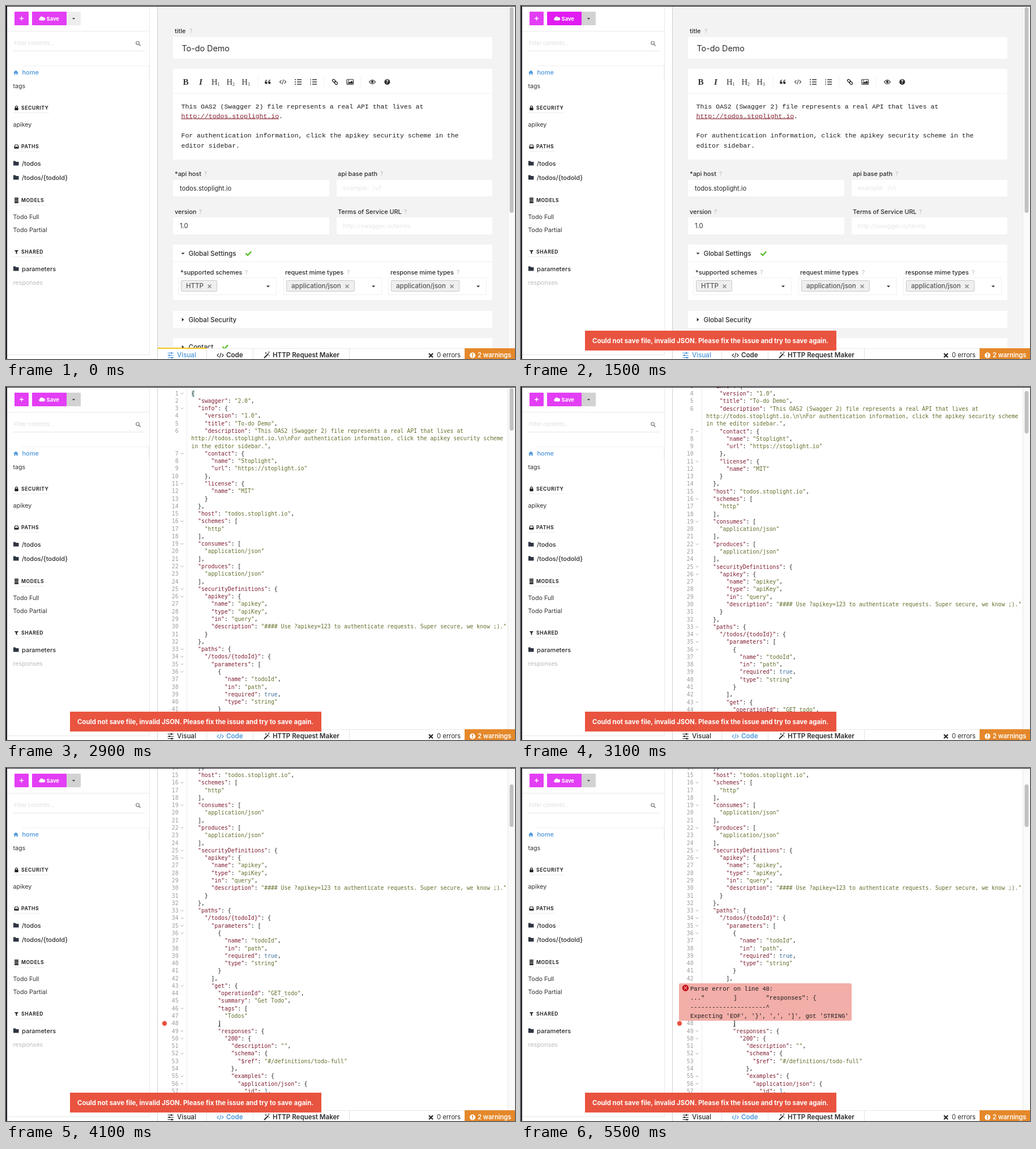
An HTML page that plays this animation: 899 by 623 pixels, repeating every 5.6 s.

```html
<!DOCTYPE html>
<html lang="en">
<head>
<meta charset="utf-8">
<title>API editor</title>
<style>
html, body { margin: 0; width: 100%; height: 100%; overflow: hidden; background: #fff; }
svg { display: block; width: 899px; height: 623px; }
text { font-family: Inter, sans-serif; white-space: pre; fill: #2b2b2f; }
.mono { font-family: "DejaVu Sans Mono", monospace; font-size: 9.74px; fill: #222; }
.courier { font-family: "Liberation Mono", monospace; fill: #1c1c1c; }
.serif { font-family: "Liberation Serif", serif; fill: #333; }
.key { fill: #7f1d30; }
.str { fill: #61712c; }
.atom { fill: #3d6f9e; }
.num { fill: #9c9c9c; text-anchor: end; }
.line { fill: none; stroke-linecap: round; stroke-linejoin: round; }

.anim { animation: 5.6s step-end -10ms infinite; }
#save { animation-name: save; }
#caret { animation-name: caret; }
#toast { animation-name: toast; }
#visual, .tabVisual { animation-name: leave; }
#code, .tabCode { animation-name: enter; }
#lines { animation-name: scroll; }
#thumb { animation-name: thumb; }
#beam { animation-name: beam; }
#popup { animation-name: popup; }

@keyframes save {
  0%, 51.79% { fill: #e33ef5; }
  16.07% { fill: #d70bf0; }
  25%, 50% { fill: #e11cf2; }
  100% { fill: #e33ef5; }
}
@keyframes caret { 0% { fill: #ededed; } 25%, 100% { fill: #d2d2d2; } }
@keyframes toast { 0% { visibility: hidden; } 25%, 100% { visibility: visible; } }
@keyframes leave { 0% { visibility: visible; } 35.71%, 100% { visibility: hidden; } }
@keyframes enter { 0% { visibility: hidden; } 35.71%, 100% { visibility: visible; } }
@keyframes scroll {
  0% { transform: none; }
  51.79% { transform: translateY(0); animation-timing-function: steps(2); }
  55.36% { transform: translateY(-39.3px); animation-timing-function: steps(7); }
  67.86%, 100% { transform: translateY(-211px); }
}
@keyframes thumb {
  0% { transform: none; }
  51.79% { transform: translateY(0); animation-timing-function: steps(2); }
  55.36% { transform: translateY(5px); animation-timing-function: steps(7); }
  67.86%, 100% { transform: translateY(27px); }
}
@keyframes beam { 0% { visibility: hidden; } 69.64%, 100% { visibility: visible; } }
@keyframes popup { 0% { visibility: hidden; } 78.57%, 100% { visibility: visible; } }
</style>
</head>
<body>
<svg id="stage" viewBox="0 0 899 623"></svg>
<script>
const esc = s => s.replace(/&/g, '&amp;').replace(/</g, '&lt;');
const text = (x, y, s, size, o = {}) =>
  `<text x="${x}" y="${y}" class="${o.cls || ''}" style="font-size:${size}px;font-weight:${o.w || 400};` +
  `${o.fill ? `fill:${o.fill};` : ''}${o.css || ''}">${esc(s)}</text>`;
const rect = (x, y, w, h, fill, extra = '') =>
  `<rect x="${x}" y="${y}" width="${w}" height="${h}" fill="${fill}" ${extra}/>`;
const fillPath = (d, fill = '#2b2b2f') => `<path d="${d}" fill="${fill}"/>`;
const line = (d, color = '#333', w = 1.2) =>
  `<path class="line" d="${d}" stroke="${color}" stroke-width="${w}"/>`;
const dot = (x, y, r, fill) => `<circle cx="${x}" cy="${y}" r="${r}" fill="${fill}"/>`;
const group = (attrs, ...parts) => `<g ${attrs}>${parts.join('')}</g>`;

const caretDown = (x, y, s = 3) => fillPath(`M${x - s} ${y - s / 2}h${2 * s}l${-s} ${s}z`);
const caretRight = (x, y) => fillPath(`M${x - 1.8} ${y - 3.2}v6.4l3.6 -3.2z`);
const cross = (x, y, s, color, w) =>
  line(`M${x - s} ${y - s}l${2 * s} ${2 * s}m0 ${-2 * s}l${-2 * s} ${2 * s}`, color, w);
const check = (x, y) => line(`M${x - 4} ${y}l3 3l5.5 -6`, '#4fbd1a', 2.2);
const folder = y => fillPath(`M13 ${y - 4}h3.5l1.2 1.4h4.8v6.6h-9.5z`, '#2f3542');
const angle = (x, y, color) =>
  line(`M${x - 3} ${y - 2.5}l-2.5 2.5l2.5 2.5M${x + 3} ${y - 2.5}l2.5 2.5l-2.5 2.5M${x + 1} ${y - 4}l-2 8`, color, 1.1);

function sidebar() {
  const heading = (y, s, width) =>
    text(27, y + 3.2, s, 8.6, { w: 700, css: 'letter-spacing:.6px' }) + rect(13, y + 8, width, 1, '#ececec');
  const item = (y, s, fill = '#333') => text(12.5, y + 4, s, 10.7, { fill });
  const folderItem = (y, s) => folder(y) + text(28, y + 4, s, 11, { w: 500 });
  return [
    rect(15, 10, 25, 24, '#e33ef5', 'rx="1"'),
    line('M24.5 22h6m-3 -3v6', '#fff', 1.4),
    rect(46, 10, 61, 24, '#e33ef5', 'rx="1" id="save" class="anim"'),
    rect(107, 10, 25, 24, '#ededed', 'rx="1" id="caret" class="anim"'),
    fillPath('M60 25.5a2.4 2.4 0 0 1 -.3 -4.6a3.2 3.2 0 0 1 5.8 -1a2.3 2.3 0 0 1 1.5 5.6z', '#fff'),
    text(71.5, 25.6, 'Save', 9.4, { w: 700, fill: '#fff' }),
    caretDown(119.5, 22.5, 2.6),
    rect(2, 44, 252, 1, '#ebebeb'),
    text(14, 69, 'Filter contents...', 9.4, { fill: '#dedede' }),
    rect(12, 79, 233, 1, '#e6e6e6'),
    '<circle cx="232.5" cy="65.3" r="2.8" fill="none" stroke="#777" stroke-width="1.2"/>',
    line('M234.8 67.6l2.3 2.3', '#777', 1.4),
    rect(28, 105, 225, 1, '#f0f0f0'), rect(252, 106, 1, 22, '#f0f0f0'),
    fillPath('M13.2 117.6l4.3 -4l4.3 4h-1.2v3.6h-2.2v-2.6h-1.8v2.6h-2.2v-3.6z', '#4a94db'),
    text(28.5, 121.3, 'home', 11, { w: 500, fill: '#4a94db' }),
    item(140.5, 'tags'),
    line('M16.6 179.5v-1.2a1.9 1.9 0 0 1 3.8 0v1.2', '#222', 1.2),
    rect(15.3, 179.2, 6.4, 4.8, '#222', 'rx=".7"'),
    heading(180, 'SECURITY', 63), item(209, 'apikey'),
    line('M15 248.5l1.2 -3.5h4.6l1.2 3.5v2.5h-7z', '#222', 1.2),
    rect(15, 248.5, 7, 2.8, '#222'),
    heading(248, 'PATHS', 47), folderItem(277.5, '/todos'), folderItem(302.5, '/todos/{todoId}'),
    [339.2, 341.8, 344.4, 347].map(y => rect(14.8, y - 1, 7.4, 2, '#222', 'rx="1"')).join(''),
    heading(343, 'MODELS', 55), item(371.5, 'Todo Full'), item(394.5, 'Todo Partial'),
    fillPath('M14.8 431h7.4l-2.7 3v4l-2 -1.3v-2.7z'),
    heading(434, 'SHARED', 54), folderItem(463.5, 'parameters'), item(487.5, 'responses', '#bbb'),
    rect(2, 615, 252, 1, '#e8e8e8'), rect(253, 1, 1, 615, '#e8e8e8'),
  ].join('');
}

function toolbar() {
  const serif = (x, s, size, css = '', w = 400) => text(x, 139, s, size, { cls: 'serif', css, w });
  const bars = (x, bullet) => [130, 134, 138].map(y => rect(x + 4, y - .7, 8, 1.5, '#333') + bullet(x, y)).join('');
  const quote = x => dot(x, 135.5, 2.2, '#333') + line(`M${x - 1.6} 135.5q0 -4 2.8 -4.8`, '#333', 1.3);
  return [
    serif(312.5, 'B', 15, '', 700), serif(341, 'I', 15, 'font-style:italic', 700),
    [1, 2, 3].map((n, i) => serif(363 + i * 26.6, 'H', 14.5) +
      text(373.5 + i * 26.6, 141, `${n}`, 8, { cls: 'serif' })).join(''),
    [445, 561, 626].map(x => rect(x, 124, 1, 20, '#f1f1f1')).join(''),
    quote(459.5), quote(465.3), angle(489, 134, '#444'),
    bars(510, (x, y) => dot(x + 1, y, 1.1, '#333')),
    bars(537, (x, y) => rect(x + .5, y - 1.3, 1, 2.6, '#333')),
    group('transform="rotate(45 581 134)" fill="none" stroke="#333" stroke-width="1.4"',
      '<rect x="575.5" y="132" width="6" height="4" rx="2"/><rect x="580.5" y="132" width="6" height="4" rx="2"/>'),
    rect(602, 129.5, 11.5, 9, 'none', 'rx="1" stroke="#333" stroke-width="1.2"'),
    fillPath('M603.5 137.3v-1.5l2.5 -2.5l1.5 1.5l3 -3l2 2v3.5z', '#333'), dot(605.2, 132, 1, '#333'),
    line('M641.5 134q5.5 -7 11 0q-5.5 7 -11 0z', '#333', 1.2), dot(647, 133.7, 2.2, '#333'),
    dot(673.3, 134, 5, '#2b2b2f'), text(670.7, 137.4, '?', 8.5, { w: 700, fill: '#fff' }),
  ].join('');
}

function visual() {
  const card = (x, y, w, h) => rect(x, y, w, h, '#fff');
  const label = (x, y, s, hintX) =>
    text(x, y + 4, s, 10.9, { w: 500 }) + text(hintX, y + 4, '?', 10, { fill: '#b9b9b9' });
  const body = (y, s, o) => text(309.5, y, s, 11.5, { cls: 'courier', ...o });
  const select = (x, s, w) => [
    rect(x + .5, 479.5, 173, 30, '#fff', 'stroke="#f0f0f0"'),
    rect(x + 5.5, 484.5, w, 19, '#efefef', 'stroke="#c9c9c9" rx="1"'),
    text(x + 14, 498, s, 11.5, { w: 500, fill: '#555' }),
    cross(x + w - 7.5, 494.7, 2.5, '#888', 1.6), caretDown(x + 159, 495),
  ].join('');
  return [
    rect(268, 1, 618, 603, '#f3f3f3'),
    label(298, 44, 'title', 324), card(295, 55, 564, 38), text(310.5, 79.7, 'To-do Demo', 14.3),
    card(295, 111, 564, 160), rect(295, 154, 564, 1, '#f1f1f1'), toolbar(),
    body(180.5, 'This OAS2 (Swagger 2) file represents a real API that lives at'),
    body(197.5, 'http://todos.stoplight.io', { fill: '#84212f', css: 'text-decoration:underline' }),
    body(197.5, ' '.repeat(25) + '.'),
    body(232, 'For authentication information, click the apikey security scheme in the'),
    body(249.5, 'editor sidebar.'),
    label(298, 296, '*api host', 350), label(586, 296, 'api base path', 661),
    card(295, 307, 276, 29), card(584, 307, 275, 29),
    text(307, 325.5, 'todos.stoplight.io', 11.2), text(595, 325.3, 'example: `/v1`', 10.8, { fill: '#e6e6e6' }),
    label(298, 362.5, 'version', 341), label(586, 362.5, 'Terms of Service URL', 703),
    card(295, 373, 276, 30), card(584, 373, 275, 30),
    text(307, 392, '1.0', 11.2), text(595, 392, 'http://swagger.io/terms', 10.8, { fill: '#e6e6e6' }),
    card(295, 421, 564, 98), rect(295, 451, 564, 1, '#f1f1f1'),
    caretDown(312.5, 437), text(322.5, 440.8, 'Global Settings', 11.6, { w: 500 }), check(428, 437),
    label(308, 469.5, '*supported schemes', 422), label(493, 469.5, 'request mime types', 602),
    label(679, 469.5, 'response mime types', 796),
    select(304, 'HTTP', 63), select(490, 'application/json', 120), select(675, 'application/json', 120),
    card(295, 538, 564, 30), caretRight(312.5, 553.5), text(322.5, 557.5, 'Global Security', 11.6, { w: 500 }),
    card(295, 586, 564, 30), caretRight(312.5, 602), text(322.5, 606, 'Contact', 11.6, { w: 500 }), check(387, 602),
    rect(889.5, 2, 7, 363, '#c1c1c1', 'rx="3.5"'),
  ].join('');
}

// Rows starting with ~ continue the wrapped string above them.
const source = String.raw`{
  "swagger": "2.0",
  "info": {
    "version": "1.0",
    "title": "To-do Demo",
    "description": "This OAS2 (Swagger 2) file represents a real API that lives at
~http://todos.stoplight.io.\n\nFor authentication information, click the apikey security scheme
~in the editor sidebar.",
    "contact": {
      "name": "Stoplight",
      "url": "https://stoplight.io"
    },
    "license": {
      "name": "MIT"
    }
  },
  "host": "todos.stoplight.io",
  "schemes": [
    "http"
  ],
  "consumes": [
    "application/json"
  ],
  "produces": [
    "application/json"
  ],
  "securityDefinitions": {
    "apikey": {
      "name": "apikey",
      "type": "apiKey",
      "in": "query",
      "description": "#### Use ?apikey=123 to authenticate requests. Super secure, we know ;)."
    }
  },
  "paths": {
    "/todos/{todoId}": {
      "parameters": [
        {
          "name": "todoId",
          "in": "path",
          "required": true,
          "type": "string"
        }
      ],
      "get": {
        "operationId": "GET_todo",
        "summary": "Get Todo",
        "tags": [
          "Todos"
        ]
        "responses": {
          "200": {
            "description": "",
            "schema": {
              "$ref": "#/definitions/todo-full"
            },
            "examples": {
              "application/json": {
                "id": 1,`.split('\n');

const span = (cls, s) => `<tspan class="${cls}">${s}</tspan>`;
const colorize = row => row[0] === '~'
  ? row.slice(1).replace(/^(.*?)(,?)$/, (_, s, comma) => span('str', s) + comma)
  : row.replace(/("[^"]*"(?=:))|("[^"]*"?)|\b(true|1)\b/g,
      (m, key, str) => span(key ? 'key' : str ? 'str' : 'atom', m));

function codeView() {
  let number = 0;
  const rows = source.map((row, i) => {
    const y = 14.6 + i * 13.28;
    let out = `<text class="mono" x="327.3" y="${y}">${colorize(row)}</text>`;
    if (row[0] !== '~') out += `<text class="mono num" x="304.5" y="${y}">${++number}</text>`;
    if (/[{[]$/.test(row)) out += line(`M309 ${y - 4.3}l2 2l2 -2`, '#aaa', 1);
    return out;
  }).join('');
  return [
    rect(268, 1, 618, 603, '#fff'), rect(319, 1, 1, 603, '#ececec'),
    group('clip-path="url(#pane)"', group('id="lines" class="anim"',
      rect(327.5, 5, 6, 12, '#cfe6e4'), rows, dot(280, 661.8, 4.2, '#e8523f'))),
    rect(889.5, 2, 7, 75, '#c1c1c1', 'rx="3.5" id="thumb" class="anim"'),
  ].join('');
}

function popup() {
  const rows = ['Parse error on line 48:', `..."${' '.repeat(8)}]${' '.repeat(8)}"responses": {`,
    '-'.repeat(21) + '^', "Expecting 'EOF', '}', ',', ']', got 'STRING'"];
  return rect(279, 380, 305, 66, '#f2aea8', 'rx="2.5"') +
    dot(290.5, 388.2, 5.7, '#c3141b') + cross(290.5, 388.2, 2, '#f6c5c1', 1.2) +
    rows.map((s, i) => text(299, 393 + i * 16, s, 10.6, { cls: 'courier' })).join('');
}

function bottomBar() {
  const blue = '#4a94db', dark = '#2b2b2f', orange = '#e5882a';
  const sliders = color => [[612.5, 292], [616.5, 288.5], [620.5, 293]]
    .map(([y, x]) => line(`M286 ${y}h9.5`, color, 1.1) + rect(x - 1, y - 1.5, 2, 3, color)).join('');
  const tabs = (cls, a, b) => group(`class="anim ${cls}"`,
    sliders(a), text(302, 620.3, 'Visual', 11.6, { w: 500, fill: a }),
    angle(378.5, 616.5, b), text(389, 620.3, 'Code', 11.5, { w: 600, fill: b }));
  return [
    rect(268, 604, 631, 19, '#fff'), rect(268, 604, 542, 1, '#e8e8e8'),
    group('class="anim tabVisual"', rect(268, 603, 86, 2, '#f5c518')),
    [354, 436, 606].map(x => rect(x, 604, 1, 19, '#e3e3e3')).join(''),
    tabs('tabVisual', blue, dark), tabs('tabCode', dark, blue),
    line('M456.5 620.5l6.5 -6.5', dark, 2),
    line('M458 612.5h2m-1 -1v2M463.5 611h1.6m-.8 -.8v1.6M464 617h1.6', dark, .9),
    text(471, 620.3, 'HTTP Request Maker', 11.55, { w: 600 }),
    cross(750.5, 616.7, 2.8, dark, 2.3), text(761, 620.3, '0 errors', 11.2),
    rect(810, 604, 89, 19, orange), dot(824, 616.5, 5, '#fff'),
    rect(823.2, 613, 1.7, 4.2, orange), rect(823.2, 618.2, 1.7, 1.6, orange),
    text(833, 620.3, '2 warnings', 11.1, { w: 600, fill: '#fff' }),
  ].join('');
}

document.getElementById('stage').innerHTML = [
  '<clipPath id="pane"><rect x="268" y="1" width="618" height="603"/></clipPath>',
  rect(0, 0, 899, 623, '#fff'), sidebar(),
  rect(886, 1, 13, 603, '#fafafa'), rect(886, 1, 1, 603, '#e8e8e8'),
  group('id="visual" class="anim"', visual()),
  group('id="code" class="anim"', codeView()),
  rect(267, 1, 1, 622, '#cfcfcf'),
  bottomBar(),
  group('id="beam" class="anim"', line('M375.5 456.5q1.5 0 1.5 -1.5q0 1.5 1.5 1.5M377 455v-5', '#333', .9)),
  group('id="popup" class="anim"', popup()),
  group('id="toast" class="anim"', rect(113, 573, 444, 35, '#e95440'),
    text(126, 594.5, 'Could not save file, invalid JSON. Please fix the issue and try to save again.', 11.45, { w: 700, fill: '#fff' })),
  rect(0, 0, 2, 623, '#1d1d26'), rect(0, 0, 899, 1, '#1d1d26'),
].join('');
</script>
</body>
</html>
```
